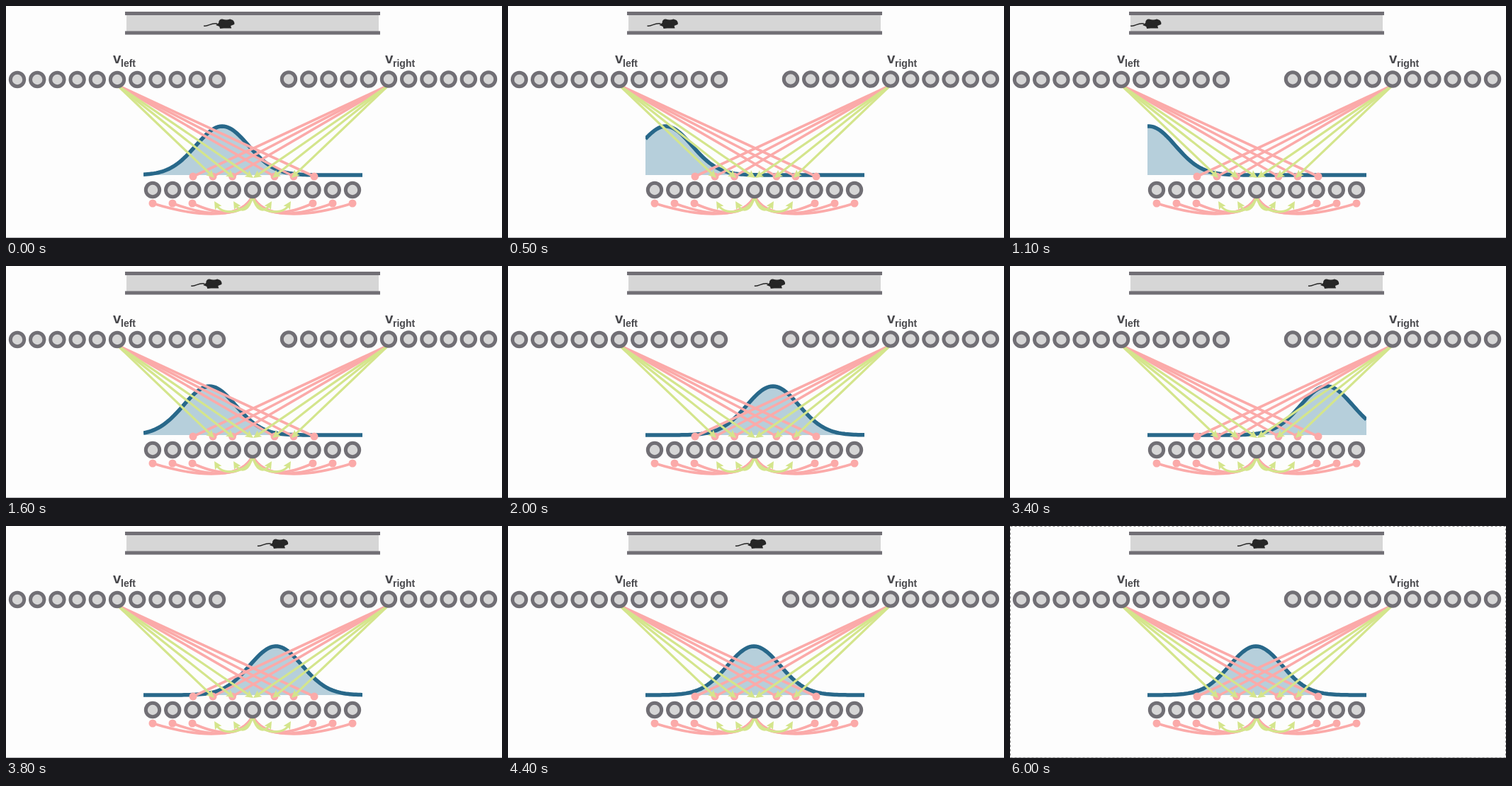
Write an HTML page that moves like this. It is 700 px wide and 328 px high and loops after 6.1 s.

```html
<!DOCTYPE html>
<html lang="en">
<head>
<meta charset="utf-8">
<title>Velocity cells and position bump</title>
<style>
  html, body { margin: 0; width: 100%; height: 100%; overflow: hidden; background: #fdfdfd; }
  svg { display: block; width: 700px; height: 328px; }
  text { font: bold 20.5px "Liberation Sans", Arial, sans-serif; fill: #48484c; }
  .sub { font-size: 14px; }
  .bar { fill: #716f75; }
  .cell { fill: #d6d6d6; stroke: #716f75; stroke-width: 5; }
  .inhibit { fill: none; stroke: #fbaaa9; stroke-width: 3.6; }
  .excite { fill: none; stroke: #d4e58c; stroke-width: 3.2; }
  .ball { fill: #fbaaa9; }
  .head { fill: #d4e58c; }
</style>
</head>
<body>
<svg viewBox="0 0 700 328">
  <defs><clipPath id="plot"><rect x="194" y="150" width="309" height="100"/></clipPath></defs>

  <rect x="170" y="12" width="356" height="25" fill="#d6d6d6"/>
  <rect class="bar" x="168" y="8" width="360" height="5"/>
  <rect class="bar" x="168" y="35.5" width="360" height="5"/>
  <g id="mouse">
    <path d="M-26 28C-20 30-16 23-7 25" fill="none" stroke="#262626" stroke-width="1.4"/>
    <path fill="#262626" d="M-9 27L-5 24Q-5 18.500 0 18.500Q6 20.500 11 18.500L15 20Q18 23 17 26L12 28L13 31.500H2L-3 32L-4 29Z"/>
  </g>

  <g clip-path="url(#plot)">
    <path id="area" fill="#b6cfdb"/>
    <path id="curve" fill="none" stroke="#28688a" stroke-width="5.500"/>
  </g>
  <g id="net"></g>

  <text x="151" y="81">v</text><text class="sub" x="162" y="86">left</text>
  <text x="535" y="81">v</text><text class="sub" x="546" y="86">right</text>

  <rect y="327" width="700" height="1" fill="#b4b4b8"/>
  <g id="marks">
    <rect x=".5" y=".5" width="699" height="327" fill="none" stroke="#8a8a8a" stroke-dasharray="3 3"/>
  </g>
</svg>
<script>
const LOOP = 6100, STEP = 100;
const LEFT = 194, RIGHT = 503, BASE = 239, HEIGHT = 69, SIGMA = 37;
const $ = id => document.getElementById(id);
const net = $('net');

function add(tag, attrs) {
  const el = document.createElementNS('http://www.w3.org/2000/svg', tag);
  for (const k in attrs) el.setAttribute(k, attrs[k]);
  net.append(el);
}
const path = (cls, d) => add('path', { class: cls, d });
const ball = (cx, cy) => add('circle', { class: 'ball', cx, cy, r: 5.5 });

// Arrowhead with its tip at (x, y), pointing along angle a.
function head(x, y, a) {
  const deg = a * 180 / Math.PI;
  add('path', { class: 'head', d: 'M0 0L-11 -5.5L-9 0L-11 5.5Z',
    transform: `translate(${x} ${y}) rotate(${deg})` });
}

function arrow(x1, y1, x2, y2) {
  const a = Math.atan2(y2 - y1, x2 - x1);
  path('excite', `M${x1} ${y1}L${x2 - 6 * Math.cos(a)} ${y2 - 6 * Math.sin(a)}`);
  head(x2, y2, a);
}

// Fans from the two velocity cells.
const fans = [
  { x: 157, inhibit: [379, 406, 435], excite: [294, 322, 349] },
  { x: 540, inhibit: [264, 292, 319.5], excite: [349, 376, 403] }
];
for (const f of fans) for (const x of f.inhibit) {
  path('inhibit', `M${f.x} 112L${x} 241`);
  ball(x, 241);
}
for (const f of fans) for (const x of f.excite) arrow(f.x, 112, x, 243);

// Recurrent links below the central cell.
for (const side of [-1, 1]) {
  const at = d => 348 + side * d;
  for (const [d, low] of [[141, 300], [113, 299], [85, 297]]) {
    path('inhibit', `M348 269C${at(14)} ${low - 3} ${at(d * .45)} ${low + 3} ${at(d)} 279`);
    ball(at(d), 279);
  }
  for (const [d, low] of [[26, 292], [53, 296]]) {
    path('excite', `M348 269C${at(5)} ${low - 4} ${at(d - 12)} ${low + 1} ${at(d - 3)} 283`);
    head(at(d + 1), 276, -Math.PI / 2 + side * .55);
  }
}

for (const [x, y] of [[16, 104], [399, 103.5], [207, 260]])
  for (let i = 0; i < 11; i++)
    add('circle', { class: 'cell', cx: x + 28.2 * i, cy: y, r: 9.7 });

// Speeds up over the first quarter, slows down over the last.
function ease(p) {
  if (p > .5) return 1 - ease(1 - p);
  return p < .25 ? p * p * 8 / 3 : (p - .125) / .75;
}

// Position of the bump: [time, x], eased between entries.
const track = [[-416, 347], [884, 186], [2868, 508], [4168, 347], [LOOP, 347]];
function place(t) {
  const i = track.findIndex(p => p[0] > t);
  const [t0, x0] = track[i - 1], [t1, x1] = track[i];
  return x0 + (x1 - x0) * ease((t - t0) / (t1 - t0));
}

function draw(t) {
  const x = place(t);
  let line = '';
  for (let px = LEFT; px <= RIGHT; px += 3) {
    const y = BASE - HEIGHT * Math.exp(-((px - x) ** 2) / (2 * SIGMA * SIGMA));
    line += `${line ? 'L' : 'M'}${px} ${y.toFixed(2)}`;
  }
  $('curve').setAttribute('d', line);
  $('area').setAttribute('d', `${line}L${RIGHT} ${BASE}L${LEFT} ${BASE}Z`);
  $('mouse').setAttribute('transform', `translate(${x.toFixed(2)} 0)`);
  $('marks').style.display = t >= 5300 ? '' : 'none';
}

const start = performance.now();
function tick() {
  const t = (performance.now() - start) % LOOP;
  draw(Math.floor(t / STEP) * STEP);
  requestAnimationFrame(tick);
}
tick();
</script>
</body>
</html>
```
